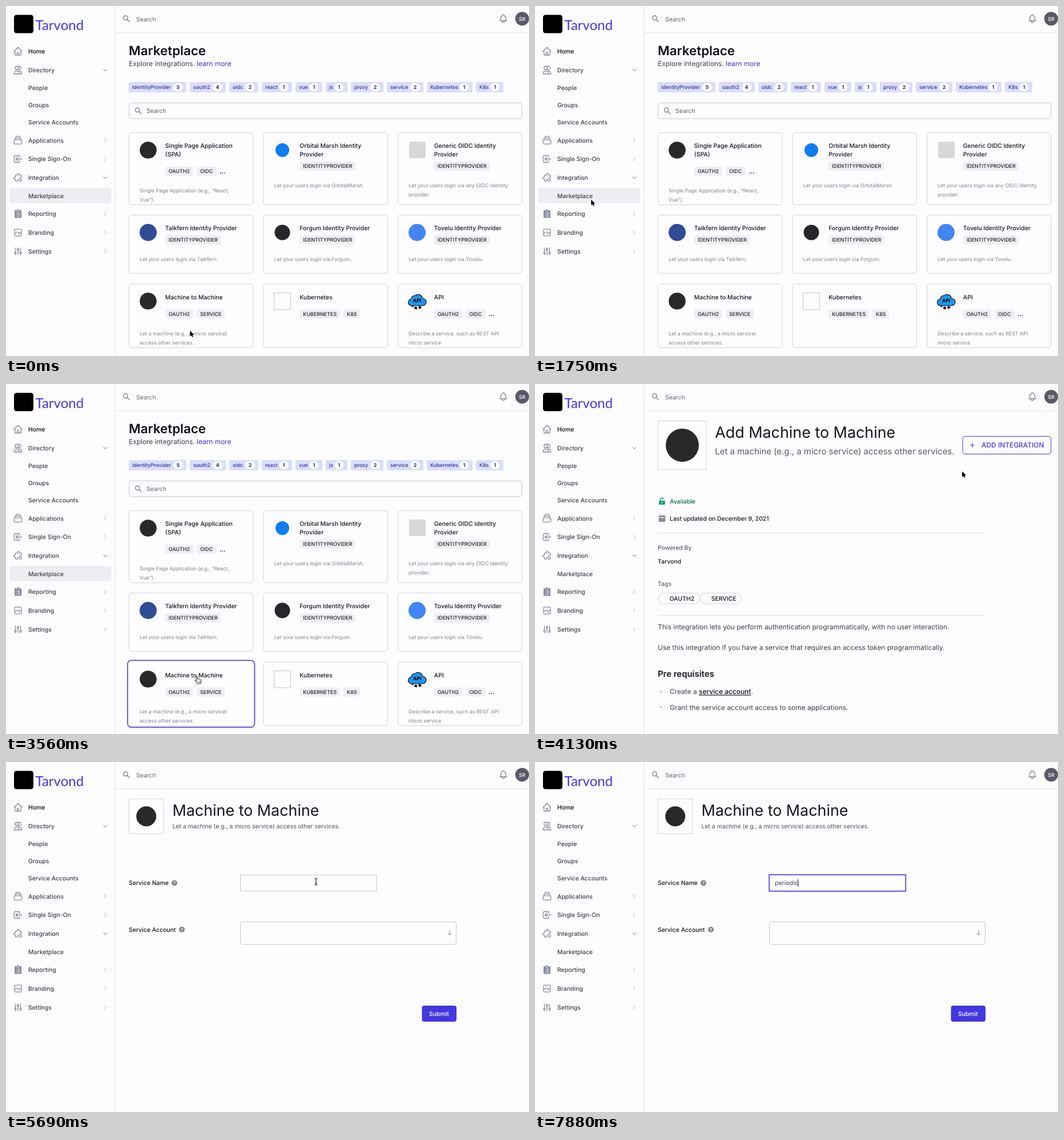
An HTML page that plays this animation: 916 by 612 pixels, repeating every 8 s.

```html
<!DOCTYPE html>
<html lang="en">
<head>
<meta charset="utf-8">
<title>Marketplace</title>
<style>
html, body { margin: 0; width: 100%; height: 100%; overflow: hidden; background: #fdfcff; }
svg { display: block; font-family: Inter, "Liberation Sans", sans-serif; text-rendering: geometricPrecision; }
.hover .frame { stroke: none; filter: drop-shadow(0 1.5px 1.5px rgba(0, 0, 0, .2)); }
</style>
</head>
<body>
<svg id="stage" width="916" height="612" viewBox="0 0 916 612"></svg>
<script>
const XS = 8.95, SM = 10.45, MD = 11.94, LG = 14.92, XL = 26.86;
const BG = '#fdfcff', INK = '#15151f', BODY = '#3c3f4c', MUTE = '#83838f',
  ICON = '#858a9b', LINE = '#d2d2d9', INDIGO = '#4338df';

// cy is the middle of the capitals
const text = (x, cy, str, size = SM, weight = 400, fill = INK, extra = '') =>
  `<text x="${x}" y="${cy + size * .364}" font-size="${size}" font-weight="${weight}" fill="${fill}" ${extra}>${str}</text>`;
const rect = (x, y, x2, y2, r = 0, fill = 'none', stroke = 'none', extra = '') =>
  `<rect x="${x}" y="${y}" width="${x2 - x}" height="${y2 - y}" rx="${r}" fill="${fill}" stroke="${stroke}" ${extra}/>`;
const disc = (x, y, r, fill) => `<circle cx="${x}" cy="${y}" r="${r}" fill="${fill}"/>`;
const line = (d, stroke = LINE, w = 1, extra = '') =>
  `<path d="${d}" fill="none" stroke="${stroke}" stroke-width="${w}" ${extra}/>`;
const icon = (cx, cy, d, size = 18) =>
  `<g transform="translate(${cx - size / 2} ${cy - size / 2}) scale(${size / 24})">` +
  line(d, ICON, 1.7, 'stroke-linecap="round" stroke-linejoin="round"') + '</g>';
const group = (id, body) => `<g id="${id}">${body}</g>`;
const mid = 'text-anchor="middle"';

const lens = (x, y) => `<circle cx="${x - 1.5}" cy="${y - 1.5}" r="3.75" fill="none" stroke="${ICON}" stroke-width="1.5"/>` +
  line(`M${x + 1.3} ${y + 1.3}l3.9 3.9`, ICON, 1.5, 'stroke-linecap="round"');

const icons = {
  home: 'M3 12l2-2m0 0l7-7 7 7M5 10v10a1 1 0 001 1h3m10-11l2 2m-2-2v10a1 1 0 01-1 1h-3m-6 0a1 1 0 001-1v-4a1 1 0 011-1h2a1 1 0 011 1v4a1 1 0 001 1m-6 0h6',
  users: 'M12 4.35a4 4 0 110 5.3M15 21H3v-1a6 6 0 0112 0v1zm0 0h6v-1a6 6 0 00-9-5.2M13 7a4 4 0 11-8 0 4 4 0 018 0z',
  stack: 'M19 11H5m14 0a2 2 0 012 2v6a2 2 0 01-2 2H5a2 2 0 01-2-2v-6a2 2 0 012-2m14 0V9a2 2 0 00-2-2M5 11V9a2 2 0 012-2m0 0V5a2 2 0 012-2h6a2 2 0 012 2v2M7 7h10',
  door: 'M11 16l-4-4m0 0l4-4m-4 4h14m-5 4v1a3 3 0 01-3 3H6a3 3 0 01-3-3V7a3 3 0 013-3h7a3 3 0 013 3v1',
  puzzle: 'M11 4a2 2 0 114 0v1a1 1 0 001 1h3a1 1 0 011 1v3a1 1 0 01-1 1h-1a2 2 0 100 4h1a1 1 0 011 1v3a1 1 0 01-1 1h-3a1 1 0 01-1-1v-1a2 2 0 10-4 0v1a1 1 0 01-1 1H7a1 1 0 01-1-1v-3a1 1 0 00-1-1H4a2 2 0 110-4h1a1 1 0 001-1V7a1 1 0 011-1h3a1 1 0 001-1V4z',
  photo: 'M4 16l4.6-4.6a2 2 0 012.8 0L16 16m-2-2l1.6-1.6a2 2 0 012.8 0L20 14m-6-6h.01M6 20h12a2 2 0 002-2V6a2 2 0 00-2-2H6a2 2 0 00-2 2v12a2 2 0 002 2z',
  sliders: 'M12 6V4m0 2a2 2 0 100 4m0-4a2 2 0 110 4m-6 8a2 2 0 100-4m0 4a2 2 0 110-4m0 4v2m0-6V4m6 6v10m6-2a2 2 0 100-4m0 4a2 2 0 110-4m0 4v2m0-6V4',
  bell: 'M15 17h5l-1.4-1.4A2 2 0 0118 14.2V11a6 6 0 00-4-5.7V5a2 2 0 10-4 0v.3A6 6 0 006 11v3.2a2 2 0 01-.6 1.4L4 17h5m6 0v1a3 3 0 11-6 0v-1m6 0H9'
};

const clipboard = rect(15, 357, 27, 370.5, 1.6, ICON) + rect(18.4, 355.6, 23.6, 359, 1.2, ICON, BG, 'stroke-width=".8"') +
  line('M17.5 362.3h1.2M20 362.3h4.5M17.5 365h1.2M20 365h4.5M17.5 367.7h1.2M20 367.7h4.5', BG, 1);

const nav = [
  ['Home', 79, 'home'], ['Directory', 112, 'users', 'down'], ['People', 143.3], ['Groups', 173.3],
  ['Service Accounts', 203.2], ['Applications', 234.7, 'stack', 'right'], ['Single Sign-On', 267.5, 'door', 'right'],
  ['Integration', 300.2, 'puzzle', 'down'], ['Marketplace', 331.8], ['Reporting', 363.3, '', 'right'],
  ['Branding', 396.1, 'photo', 'right'], ['Settings', 429, 'sliders', 'right']
];
const chevrons = { down: ['M170.5 -1.8l3.5 3.5 3.5 -3.5', '#6f7382'], right: ['M172 -3.5l3.5 3.5 -3.5 3.5', '#b0b3bd'] };

const sidebar = rect(14, 15.5, 48, 47.5, 4.5, '#000') +
  text(51.5, 33, 'Tarvond', 24, 400, INDIGO, 'style="font-family:Lato,sans-serif"') +
  group('active', rect(6, 318, 184.5, 345, 4, '#eeedf1')) +
  nav.map(([name, y, ic, chev]) =>
    (ic ? icon(21, y, icons[ic]) : '') + text(39, y, name, SM, 500, name === 'Home' ? '#0b0b12' : BODY) +
    (chev ? `<g transform="translate(0 ${y})">${line(chevrons[chev][0], chevrons[chev][1], 1)}</g>` : '')).join('') +
  clipboard;

const topbar = line('M191 0V612M191 47H916', '#e2e2e7') + lens(211, 22.3) + text(228, 23, 'Search', SM, 400, '#5f6270') +
  icon(871, 22, icons.bell) + disc(904, 22.3, 12, '#5a5967') + text(904, 22.3, 'SR', XS, 500, '#fff', mid);

const filters = [
  ['identityProvider', 5, 215, 316], ['oauth2', 4, 322, 385], ['oidc', 2, 391, 442], ['react', 1, 448, 501],
  ['vue', 1, 507, 554], ['js', 1, 560, 598], ['proxy', 2, 604, 661], ['service', 2, 667, 731],
  ['Kubernetes', 1, 737, 817], ['K8s', 1, 823, 871]
].map(([name, n, x, x2]) => {
  const c = x2 - 14.5, half = n > 1 ? 8.7 : 7.8;
  return rect(x, 133, x2, 151, 2.2, '#dadefb') + text(x + 6, 142, name, XS, 500, '#34309c') +
    rect(c - half, 135, c + half, 149, 7, '#fff') + text(c, 142, n, XS, 700, '#2b277e', mid);
}).join('');

const chip = (x, cy, w, name) => rect(x, cy - 8, x + w, cy + 8, 3, '#efeff3') + text(x + 6, cy, name, XS, 500, '#20202b');

const cols = [215.5, 451, 686.5], rows = [[221.5, 347.5], [365.5, 467.5], [486, 597.5]];
// Title lines, then chips as [x offset, width, label], then description lines
const card = (c, r, titles, chips, desc, art, chipY, descY) => {
  const x = cols[c], [y, y2] = rows[r];
  return group(`card${c}${r}`,
    `<g class="frame" stroke="${LINE}">${rect(x, y, x + 217.3, y2, 4.5, BG, 'inherit')}</g>` + art +
    titles.map((s, i) => text(x + 63.3, y + 23 + i * 14.9, s, SM, 500)).join('') +
    chips.map(([dx, w, s]) => w ? chip(x + dx, chipY, w, s) : text(x + dx, chipY, s, SM, 700)).join('') +
    desc.map((s, i) => text(x + 18.5, descY + i * 16.2, s, XS, 400, MUTE)).join(''));
};
const provider = [[63.3, 97.5, 'IDENTITYPROVIDER']], badge = '#29292b';
const apiArt = '<circle cx="720" cy="519" r="9.3" fill="none" stroke="#16161c" stroke-width="4.4" stroke-dasharray="4.6 2.7"/>' +
  '<path d="M710.5 524a5.8 5.8 0 01-.5-11.6a5.8 5.8 0 016.3-6a7.8 7.8 0 0113 5a6.2 6.2 0 01.7 12.6z" fill="#1f95ee" stroke="#16161c" stroke-width="1.2"/>' +
  text(720, 515, 'API', 8.5, 800, '#16161c', mid);

const cards = [
  card(0, 0, ['Single Page Application', '(SPA)'], [[63.3, 49, 'OAUTH2'], [118.5, 35, 'OIDC'], [158.5, 0, '...']],
    ['Single Page Application (e.g., “React,', 'Vue”).'], disc(249, 252, 14.8, badge), 289, 322.5),
  card(1, 0, ['Orbital Marsh Identity', 'Provider'], provider, ['Let your users login via OrbitalMarsh.'],
    disc(484, 252, 12, '#0f7cf2'), 280, 313.5),
  card(2, 0, ['Generic OIDC Identity', 'Provider'], provider, ['Let your users login via any OIDC identity', 'provider.'],
    rect(706, 237, 735, 266, 3.5, '#d8d7da'), 280, 313.5),
  card(0, 1, ['Talkfern Identity Provider'], provider, ['Let your users login via Talkfern.'], disc(249, 396, 15, '#304c94'), 409, 443),
  card(1, 1, ['Forgum Identity Provider'], provider, ['Let your users login via Forgum.'], disc(484, 396, 13.5, '#26262c'), 409, 443),
  card(2, 1, ['Tovelu Identity Provider'], provider, ['Let your users login via Tovelu.'], disc(720, 396, 15, '#4285f4'), 409, 443),
  card(0, 2, ['Machine to Machine'], [[63.3, 49, 'OAUTH2'], [118.5, 49, 'SERVICE']],
    ['Let a machine (e.g., a micro service)', 'access other services.'], disc(249, 516, 14.8, badge), 538.5, 572.5),
  card(1, 2, ['Kubernetes'], [[63.3, 70, 'KUBERNETES'], [140, 29, 'K8S']], [],
    rect(469.5, 501.5, 498.5, 531, 0, BG, '#c6c6cc'), 538.5, 572.5),
  card(2, 2, ['API'], [[63.3, 49, 'OAUTH2'], [118.5, 35, 'OIDC'], [158.5, 0, '...']],
    ['Describe a service, such as REST API', 'micro service'], apiArt, 538.5, 572.5)
].join('');

const link = '#3e2fcb';
const market = text(215, 78, 'Marketplace', 22.4, 600, '#101018') +
  text(215, 100.4, `Explore integrations. <tspan fill="${link}">learn more</tspan>`, MD, 400, BODY) + filters +
  rect(215.5, 169.5, 903.5, 197, 4, BG, '#c8c8cf') + lens(231.7, 183.2) + text(246, 183, 'Search', SM, 400, '#5f6270') + cards +
  group('cardRing', rect(212.8, 483.3, 435.5, 600.2, 6.7, 'none', INDIGO, 'stroke-width="1.5"'));

const about = 'Let a machine (e.g., a micro service) access other services.';
const pill = (x, x2, name) => rect(x, 365.5, x2, 384.5, 9.5, BG, LINE) + text(x + 20, 375, name, SM, 500);
const bullet = (y, body) => disc(220.5, y, 2, '#cbcbd2') + text(236, y, body, MD, 400, BODY);
const detail = rect(215.5, 64.5, 300, 149.5, 0, BG, LINE) + disc(258, 107, 29, badge) +
  text(315.3, 84, 'Add Machine to Machine', XL) + text(315.3, 118, about, LG, 400, '#565966') +
  rect(749, 91.5, 903.7, 122.5, 4.5, BG, INDIGO) + line('M762.2 107h7.4M765.9 103.3v7.4', INDIGO, 1.2) +
  text(782, 107, 'ADD INTEGRATION', MD, 500, INDIGO) +
  group('buttonRing', rect(746, 88.7, 906.4, 125.3, 6.5, 'none', INDIGO, 'stroke-width="1.5"')) +
  rect(217, 204, 228, 211, 1.6, '#12a36f') + line('M219.6 204v-2a2.9 2.9 0 015.6 -.8', '#12a36f', 1.5) + disc(222.5, 207.5, 1, BG) +
  text(236, 205, 'Available', SM, 500, '#0d6a4c') +
  rect(216.8, 230, 228.3, 241, 1.6, ICON) + line('M219.7 228.6v2.6M225.4 228.6v2.6', ICON, 1.5) + line('M218.3 233.6h8.5', BG, 1.3) +
  text(236, 235, 'Last updated on December 9, 2021', SM, 500) +
  line('M215 260.5H788M215 404.5H788', '#dedee3') +
  text(215, 286, 'Powered By', SM, 500, '#5b5e6b') + text(215, 310, 'Tarvond', SM, 500) +
  text(215, 349, 'Tags', SM, 500, '#5b5e6b') + pill(215.5, 288.3, 'OAUTH2') + pill(288.7, 362, 'SERVICE') +
  text(215, 425, 'This integration lets you perform authentication programmatically, with no user interaction.', MD, 400, BODY) +
  text(215, 461, 'Use this integration if you have a service that requires an access token programmatically.', MD, 400, BODY) +
  text(215, 507, 'Pre requisites', LG, 600) +
  bullet(538, `Create a <tspan font-weight="500" fill="${INK}" text-decoration="underline">service account</tspan>.`) +
  bullet(565.3, 'Grant the service account access to some applications.');

const help = (x, y) => disc(x, y, 5, '#85858f') + text(x, y, '?', 7.5, 700, '#fff', mid);
const form = rect(215.5, 64.5, 276, 125.3, 0, BG, LINE) + disc(245.7, 95, 17.5, badge) +
  text(291.5, 84, 'Machine to Machine', XL) + text(291.5, 112.3, about, SM, 400, '#4c4f5c') +
  text(215, 211.5, 'Service Name', SM, 500) + help(295, 211.5) + text(215, 293, 'Service Account', SM, 500) + help(308, 293) +
  rect(410.5, 197.5, 649, 225.5, 0, BG, '#c6c6cc') +
  group('fieldRing', rect(410.2, 197.2, 649.3, 225.8, 0, BG, INDIGO, 'stroke-width="1.6"')) +
  text(420.3, 211.5, '', SM, 400, BODY, 'id="typed"') + group('caret', rect(0, 205, 1, 218, 0, '#111')) +
  rect(410.5, 279.5, 788.5, 319, 4, BG, '#c6c6cc') + line('M777 294v8.5M773.7 299.3l3.3 3.3 3.3 -3.3', '#85858f', 1) +
  rect(728.5, 426, 789, 454, 4, INDIGO) + text(741, 440, 'Submit', SM, 500, '#fff');

const beam = 'M-2.6 -5.8Q0 -5.8 0 -4.4Q0 -5.8 2.6 -5.8M0 -4.6V4.6M-2.6 5.8Q0 5.8 0 4.4Q0 5.8 2.6 5.8M-1.4 2H1.4';
const cursors =
  group('arrow', '<path d="M0 0V10L2.3 7.9L3.8 11.3L5.5 10.5L4.1 7.2H7.2Z" fill="#000" stroke="#fff" stroke-width="1.3" paint-order="stroke"/>') +
  group('hand', '<path d="M-1.2 .8C-1.2 -.4 .9 -.4 .9 .8V4.2C1.6 3.6 2.8 3.8 3 4.7C3.8 4.1 4.9 4.5 5 5.4C5.9 5 6.8 5.5 6.8 6.5V8.5C6.8 10 6 11 5.8 12.2H-.4C-1 11 -3.6 8.2 -4 7C-4.2 6 -3 5.7 -2.2 6.6L-1.2 7.6Z" fill="#fff" stroke="#000" stroke-width=".9"/>' +
    line('M1 8v2.6M2.8 8v2.6M4.6 8v2.6', '#000', .6)) +
  group('beam', line(beam, '#fff', 2.2) + line(beam, '#000', 1));

document.getElementById('stage').innerHTML = rect(0, 0, 916, 612, 0, BG) + sidebar + topbar +
  group('market', market) + group('detail', detail) + group('form', form) + group('pointer', cursors);

const el = id => document.getElementById(id);
const show = (id, on) => { el(id).style.display = on ? '' : 'none'; };

const LOOP = 8000, STEP = 62.5;
const OPEN_DETAIL = 3750, OPEN_FORM = 4810, FOCUS = 6240;
// time, x, y
const path = [
  [870, 322.3, 567.8], [1440, 77, 334], [1690, 98.3, 338.5], [1870, 98.3, 338.5], [2440, 260, 457.5], [2690, 260, 457.5],
  [3250, 335, 511.7], [3625, 335, 511.7], [4125, 748, 152.8], [4440, 811, 111], [4930, 811, 111], [5625, 543, 209.3],
  [5940, 543, 209.3], [6180, 541, 209.3]
];
const keys = [7000, 7120, 7180, 7240, 7370, 7550, 7620, 7870];
const word = 'periodic';

function pointerAt(t) {
  const i = path.findIndex(p => p[0] > t);
  if (i === 0) return path[0].slice(1);
  if (i < 0) return path[path.length - 1].slice(1);
  const [t0, x0, y0] = path[i - 1], [t1, x1, y1] = path[i];
  const u = (t - t0) / (t1 - t0), e = u * u * (3 - 2 * u);
  return [x0 + (x1 - x0) * e, y0 + (y1 - y0) * e];
}
const within = (x, y, a, b, c, d) => x >= a && x <= c && y >= b && y <= d;

function render(t) {
  const view = t < OPEN_DETAIL ? 'market' : t < OPEN_FORM ? 'detail' : 'form';
  ['market', 'detail', 'form'].forEach(v => show(v, v === view));
  show('active', view === 'market');

  const [x, y] = pointerAt(t);
  let shape = 'arrow';
  cols.forEach((cx, c) => rows.forEach(([top, bottom], r) => {
    const over = view === 'market' && t > 1700 && within(x, y, cx, top, cx + 217, bottom);
    el(`card${c}${r}`).classList.toggle('hover', over);
    if (over) shape = 'hand';
  }));
  if (view === 'detail' && within(x, y, 749, 91, 904, 123)) shape = 'hand';
  if (view === 'form' && within(x, y, 410, 197, 649, 226)) shape = 'beam';
  ['arrow', 'hand', 'beam'].forEach(s => show(s, s === shape));
  el('pointer').setAttribute('transform', `translate(${x} ${y})`);
  show('pointer', t < keys[0]);

  show('cardRing', t >= 3430);
  show('buttonRing', t >= 4620);
  show('fieldRing', t >= FOCUS);

  const n = keys.filter(k => t >= k).length, typed = el('typed');
  typed.textContent = word.slice(0, n);
  const end = 420 + (n ? typed.getComputedTextLength() : 0);
  el('caret').setAttribute('transform', `translate(${end} 0)`);
  show('caret', t >= FOCUS && (t < FOCUS + 500 || n > 0));
}

const start = performance.now();
function tick() {
  const t = Math.max(0, performance.now() - start) % LOOP;
  render(Math.floor((t + 5) / STEP) * STEP);
  requestAnimationFrame(tick);
}
render(0);
requestAnimationFrame(tick);
</script>
</body>
</html>
```
